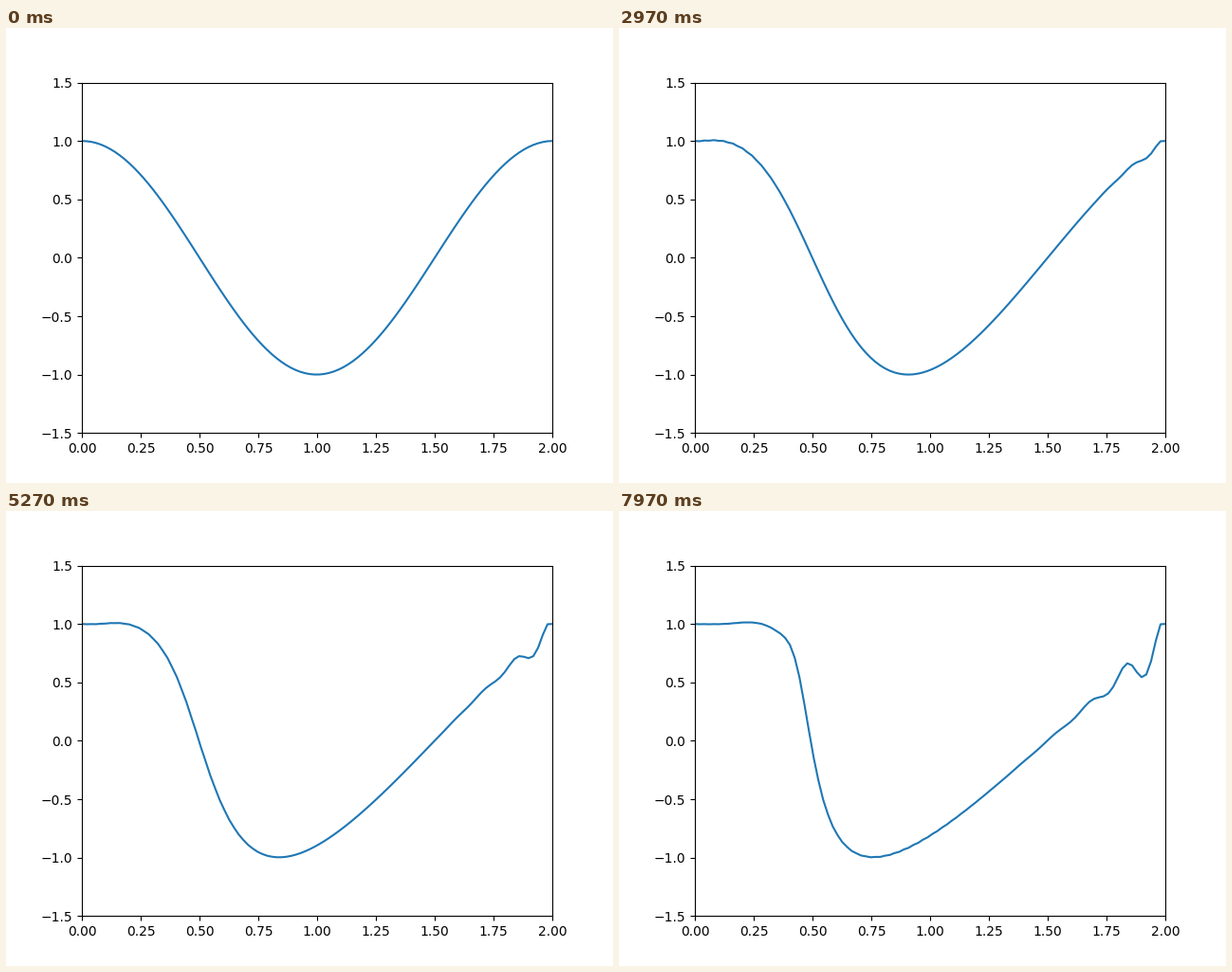
A matplotlib script for the animation above (8 s loop, 640 by 480 pixels).

```python
import numpy as np
import matplotlib.pyplot as plt
from matplotlib.animation import FuncAnimation

# Korteweg-de Vries equation, Zabusky-Kruskal leapfrog scheme
N = 100
DX = 2 / N
DT = 0.001
DELTA = 0.022
FRAMES = 240
LEAD = 2  # steps taken before the first picture


def step(prev, cur):
    """Advance one leapfrog step; two points at each end stay fixed."""
    new = cur.copy()
    l2, l1, mid, r1, r2 = cur[:-4], cur[1:-3], cur[2:-2], cur[3:-1], cur[4:]
    advect = (r1 + mid + l1) * (r1 - l1) / (3 * DX)
    disperse = DELTA**2 * (r2 - 2 * r1 + 2 * l1 - l2) / DX**3
    new[2:-2] = prev[2:-2] - DT * (advect + disperse)
    return new


def solve(x):
    prev = cur = np.cos(np.pi * x)
    states = [cur]
    for _ in range(LEAD + FRAMES):
        prev, cur = cur, step(prev, cur)
        states.append(cur)
    return states[LEAD:]


x = np.linspace(0, 2, N)
waves = solve(x)

fig, ax = plt.subplots(figsize=(6.4, 4.8), dpi=100)
line, = ax.plot(x, waves[0])
ax.set_xlim(0, 2)
ax.set_ylim(-1.5, 1.5)


def update(i):
    line.set_ydata(waves[i])
    return line,


anim = FuncAnimation(fig, update, frames=FRAMES, interval=8000 / FRAMES,
                     repeat=True, repeat_delay=0)
plt.show()
```
